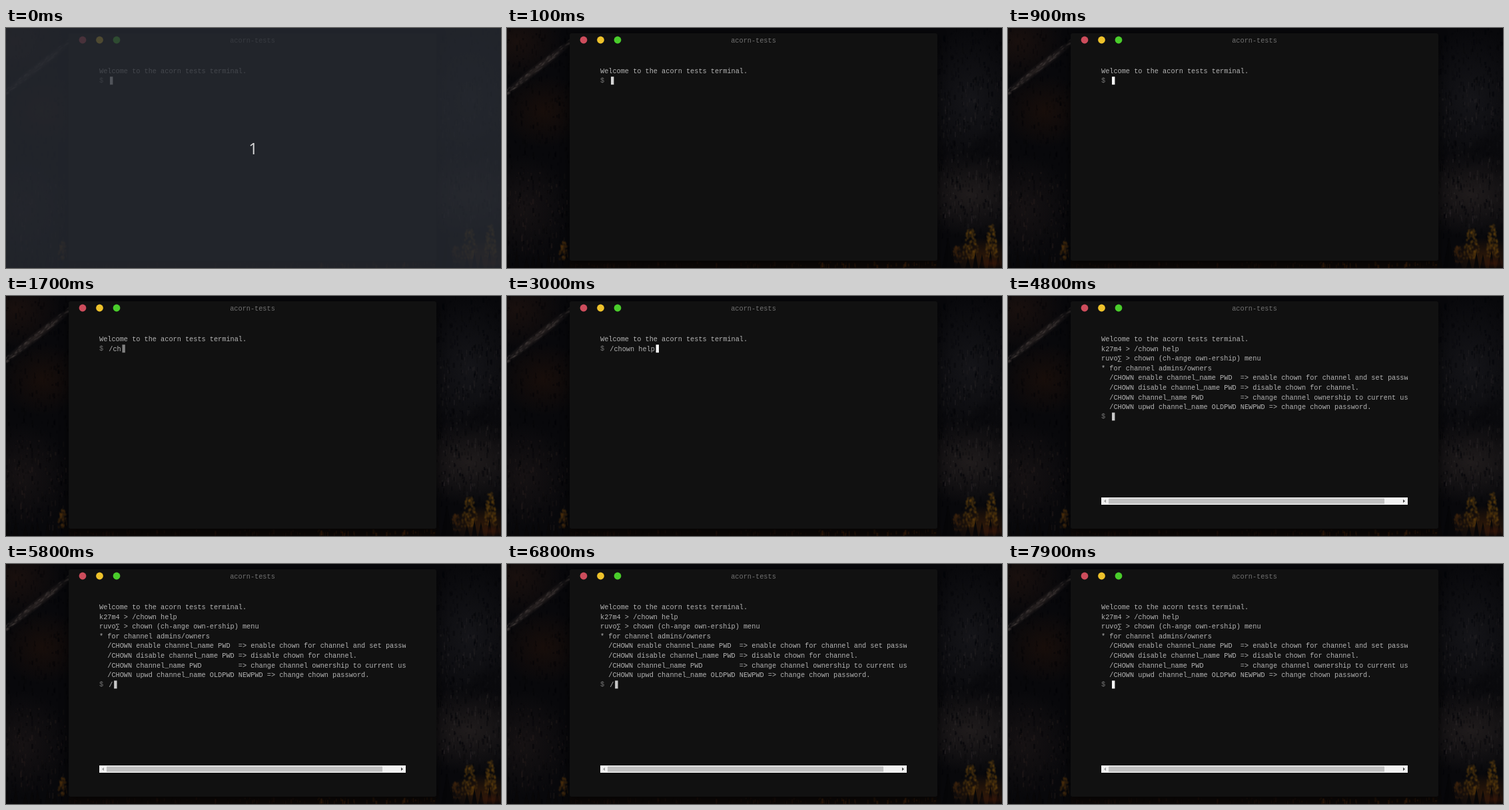
An HTML page with a canvas for the animation above (8 s loop, 743x361 px).

```html
<!DOCTYPE html>
<html lang="en">
<head>
<meta charset="utf-8">
<title>Terminal</title>
<style>
  html, body { margin: 0; width: 100%; height: 100%; overflow: hidden; background: #0a0a0e; }
  canvas { display: block; width: 743px; height: 361px; }
</style>
</head>
<body>
<canvas id="stage" width="743" height="361"></canvas>
<script>
const W = 743, H = 361, LOOP = 8000, STEP = 100;
const LEFT = 140, CHAR = 6.144, ROW = 14.6;
const MONO = '10.24px "Liberation Mono", monospace';
const ctx = document.getElementById('stage').getContext('2d');

const WELCOME = 'Welcome to the acorn tests terminal.';
const COMMAND = '/chown help';
const ECHO = 'k27m4 > ' + COMMAND;
const MENU = [
  'ruvo∑ > chown (ch-ange own-ership) menu',
  '* for channel admins/owners',
  '  /CHOWN enable channel_name PWD  => enable chown for channel and set password.',
  '  /CHOWN disable channel_name PWD => disable chown for channel.',
  '  /CHOWN channel_name PWD         => change channel ownership to current user.',
  '  /CHOWN upwd channel_name OLDPWD NEWPWD => change chown password.'
];

// Moments in ms at which each key lands
const KEYS = [1100, 1400, 1600, 1800, 1900, 2100, 2200, 2400, 2500, 2700, 2800];
const ENTER = 3200, REPLY = 3700, SLASH = 5100, ERASE = 7000;

function rect(c, color, x, y, w, h) {
  c.fillStyle = color;
  c.fillRect(x, y, w, h);
}

function shape(c, color, points) {
  c.fillStyle = color;
  c.beginPath();
  points.forEach(([x, y]) => c.lineTo(x, y));
  c.fill();
}

function disc(c, color, x, y, r) {
  c.fillStyle = color;
  c.beginPath();
  c.arc(x, y, r, 0, Math.PI * 2);
  c.fill();
}

function glow(c, rgb, alpha, x, y, rx, ry, angle = 0) {
  c.save();
  c.translate(x, y);
  c.rotate(angle);
  c.scale(rx, ry);
  const g = c.createRadialGradient(0, 0, 0, 0, 0, 1);
  g.addColorStop(0, `rgba(${rgb},${alpha})`);
  g.addColorStop(1, `rgba(${rgb},0)`);
  rect(c, g, -1, -1, 2, 2);
  c.restore();
}

function random(seed) {
  return () => (seed = seed * 16807 % 2147483647) / 2147483647;
}

// Short upright flecks scattered over a box
function flecks(c, rnd, rgb, alpha, x, y, w, h, count) {
  for (let i = 0; i < count; i++) {
    rect(c, `rgba(${rgb},${alpha * rnd()})`, x + rnd() * w, y + rnd() * h,
      1 + rnd() * 2, 2 + rnd() * 7);
  }
}

// Narrow tree that widens downwards
function tree(c, rnd, rgb, alpha, x, top, width, height) {
  for (let i = 0; i < height * 2.5; i++) {
    const d = rnd(), spread = width * (0.2 + 0.8 * Math.sqrt(d));
    glow(c, rgb, alpha, x + (rnd() - 0.5) * spread, top + d * height, 2.5, 3);
  }
}

function drawLandscape(c) {
  const rnd = random(77);
  rect(c, '#08080b', 0, 0, W, H);

  // Left slope with its pale ridge
  glow(c, '32,19,15', 0.7, 15, 20, 70, 60);
  glow(c, '27,15,10', 0.8, 55, 125, 65, 55);
  glow(c, '25,20,21', 0.8, 25, 270, 70, 80);
  glow(c, '54,46,44', 0.65, 45, 61, 85, 7, -0.67);
  for (let i = 0; i < 70; i++) {
    const x = rnd() * 96;
    glow(c, '76,68,66', 0.35, x, 97 - x * 0.8 + (rnd() - 0.5) * 9, 4, 1.5, -0.67);
  }
  flecks(c, rnd, '0,2,6', 0.5, 0, 0, 94, H, 420);
  flecks(c, rnd, '48,37,34', 0.35, 0, 215, 90, 130, 130);
  tree(c, rnd, '92,56,12', 0.25, 85, 322, 16, 26);

  // Right cliff
  glow(c, '22,22,26', 0.9, 695, 110, 80, 110);
  glow(c, '36,31,31', 0.85, 695, 250, 95, 65);
  flecks(c, rnd, '3,4,8', 0.55, 646, 0, 97, 320, 520);
  flecks(c, rnd, '55,50,51', 0.3, 650, 75, 93, 220, 230);
  glow(c, '8,8,11', 0.8, 715, 180, 55, 22, -0.5);

  // Autumn trees and dark spruces along the bottom
  glow(c, '52,27,8', 0.8, 715, 345, 50, 30);
  rect(c, '#0c0807', 94, 350, 552, 11);
  flecks(c, rnd, '82,44,14', 0.4, 440, 351, 205, 6, 60);
  flecks(c, rnd, '42,22,14', 0.4, 94, 351, 350, 6, 80);
  tree(c, rnd, '122,80,12', 0.24, 696, 303, 26, 45);
  tree(c, rnd, '122,80,12', 0.24, 727, 296, 19, 50);
  tree(c, rnd, '86,48,12', 0.2, 675, 328, 16, 24);
  for (const from of [2, 648]) {
    for (let x = from; x < from + 90; x += 8 + rnd() * 8) {
      const top = 330 + rnd() * 22;
      shape(c, '#080708', [[x, top], [x + 4, H], [x - 4, H]]);
    }
  }
  shape(c, '#060608', [[662, 315], [671, H], [653, H]]);
  glow(c, '76,28,8', 0.5, 728, 354, 22, 9);
}

function drawWindow(c) {
  c.save();
  c.shadowColor = 'rgba(0,0,0,.6)';
  c.shadowBlur = 14;
  c.shadowOffsetY = 3;
  c.fillStyle = '#111';
  c.beginPath();
  c.roundRect(94, 8, 552, 342, 3);
  c.fill();
  c.restore();
  disc(c, '#cd4d5c', 115, 18, 5.4);
  disc(c, '#eec22b', 140.5, 18, 5.4);
  disc(c, '#4acd2b', 166, 18, 5.4);
  c.font = MONO;
  c.textAlign = 'center';
  c.fillStyle = '#707070';
  c.fillText('acorn-tests', 370, 22);
}

function drawScrollbar() {
  rect(ctx, '#f1f1f1', LEFT, 303, 460, 11);
  rect(ctx, '#c1c1c1', 151, 304.5, 414, 8);
  shape(ctx, '#a0a0a0', [[147, 306], [147, 311], [144, 308.5]]);
  shape(ctx, '#404040', [[593, 306], [593, 311], [596, 308.5]]);
}

function text(str, x, y, color) {
  ctx.fillStyle = color;
  ctx.fillText(str, x, y);
}

function typedAt(t) {
  if (t < ENTER) return COMMAND.slice(0, KEYS.filter(k => k <= t).length);
  return t >= SLASH && t < ERASE ? '/' : '';
}

function cursorAlpha(t) {
  const a = 0.5 + 0.5 * Math.cos((t / 1000 - 0.96) * Math.PI * 2);
  return a < 0.04 ? 0 : a;
}

function drawPrompt(row, t) {
  const typed = typedAt(t), y = 68 + row * ROW;
  text('$', LEFT, y - 0.6, '#747474');
  text(typed, 154.3, y + 0.4, '#b4b4b4');
  ctx.globalAlpha = cursorAlpha(t);
  rect(ctx, '#fff', 156 + typed.length * CHAR, y - 9.4, 4.4, 12);
  ctx.globalAlpha = 1;
}

function drawCountdown() {
  rect(ctx, 'rgba(39,43,50,.8)', 0, 0, W, H);
  ctx.font = '24px "Open Sans", "Noto Sans", sans-serif';
  ctx.textAlign = 'center';
  text('1', 371, 189.5, '#dcdcdc');
}

const backdrop = document.createElement('canvas');
backdrop.width = W;
backdrop.height = H;
const back = backdrop.getContext('2d');
drawLandscape(back);
drawWindow(back);

function draw(t) {
  ctx.drawImage(backdrop, 0, 0);
  const lines = [WELCOME];
  if (t >= ENTER) lines.push(ECHO);
  if (t >= REPLY) lines.push(...MENU);

  ctx.save();
  ctx.beginPath();
  ctx.rect(LEFT, 50, 460, 264);
  ctx.clip();
  ctx.font = MONO;
  ctx.textAlign = 'left';
  lines.forEach((line, i) => text(line, LEFT, 68 + i * ROW, '#b4b4b4'));
  drawPrompt(lines.length, t);
  if (t >= REPLY) drawScrollbar();
  ctx.restore();

  if (t < STEP) drawCountdown();
}

const start = performance.now();
function tick() {
  const t = (performance.now() - start) % LOOP;
  draw(Math.floor(t / STEP) * STEP);
  requestAnimationFrame(tick);
}
tick();
</script>
</body>
</html>
```
